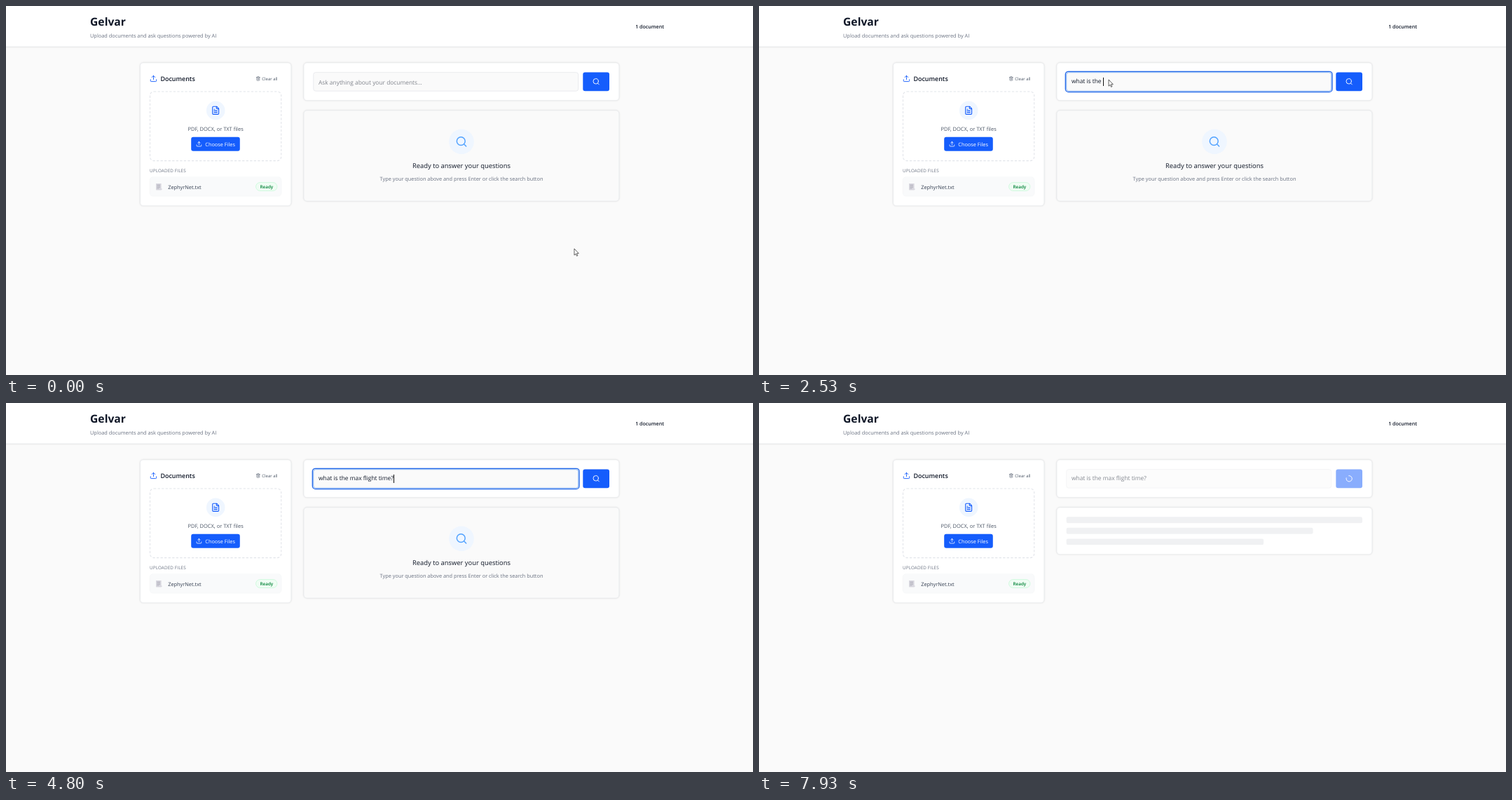
An HTML page for the animation above (8 s loop, 1066 px wide and 526 px high).

```html
<!DOCTYPE html>
<html lang="en">
<head>
<meta charset="utf-8">
<title>Document search</title>
<style>
  html, body { margin: 0; width: 100%; height: 100%; overflow: hidden; background: #fafafa; }
  body { position: relative; font-family: "Open Sans", "Noto Sans", sans-serif; text-rendering: geometricPrecision; }
  svg.stage { position: absolute; left: 0; top: 0; display: block; }
  .card { fill: #fff; stroke: #e5e7eb; stroke-width: .6; filter: drop-shadow(0 .6px .8px rgba(0, 0, 0, .13)); }
  .flat { fill: #fafafa; }
  .icon { fill: none; stroke-width: 2; stroke-linecap: round; stroke-linejoin: round; }
  .sm { font-size: 7.38px; }
  .mid { text-anchor: middle; }
  .semi { font-weight: 600; }
  .blue { fill: #155dfc; }
  .pale { fill: #eff6ff; }
  .muted { fill: #6a7282; }
  .dark { fill: #101828; }
  .typed { position: absolute; left: 446px; top: 102px; height: 12px; font-size: 8.39px;
    line-height: 12.2px; white-space: pre; color: #101828; }
  .caret { position: absolute; left: 100%; top: 0; width: .8px; height: 12px; background: #111; }
  .popup { position: absolute; top: 81.5px; height: 19.5px; box-sizing: border-box; display: flex; gap: 15.3px;
    padding: 0 6.5px 0 10.5px; border-radius: 4px; background: #2b2b2b; color: #fff;
    font-size: 7.3px; line-height: 19.6px; white-space: nowrap; box-shadow: 0 1px 2.5px rgba(0, 0, 0, .35); }
</style>
</head>
<body>
<svg class="stage" width="1066" height="526" viewBox="0 0 1066 526">
  <defs>
    <path id="upload" d="M21 15v4a2 2 0 0 1-2 2H5a2 2 0 0 1-2-2v-4M17 8l-5-5-5 5M12 3v12"/>
    <path id="search" d="M19 11a8 8 0 1 1-16 0a8 8 0 1 1 16 0M21 21l-4.34-4.34"/>
    <path id="trash" d="M3 6h18M19 6v14a2 2 0 0 1-2 2H7a2 2 0 0 1-2-2V6M8 6V4a2 2 0 0 1 2-2h4a2 2 0 0 1 2 2v2M10 11v6M14 11v6"/>
    <path id="file" d="M15 2H6a2 2 0 0 0-2 2v16a2 2 0 0 0 2 2h12a2 2 0 0 0 2-2V7ZM14 2v4a2 2 0 0 0 2 2h4M10 9H8M16 13H8M16 17H8"/>
  </defs>

  <!-- header -->
  <rect class="card" x="-5" y="-5" width="1076" height="63"/>
  <text class="dark" x="120" y="27.9" font-size="15.7" font-weight="700">Gelvar</text>
  <text class="muted sm" x="120" y="44.6">Upload documents and ask questions powered by AI</text>
  <text class="dark semi" x="939" y="32.2" font-size="7.1" text-anchor="end">1 document</text>

  <!-- documents -->
  <rect class="card" x="191.5" y="81" width="215.3" height="203.7" rx="4.4"/>
  <use class="icon" href="#upload" stroke="#155dfc" transform="translate(204.9 97.9) scale(.4625)"/>
  <text class="dark semi" x="220.4" y="107.2" font-size="8.95">Documents</text>
  <use class="icon" href="#trash" stroke="#4a5565" transform="translate(356.5 100.1) scale(.2775)"/>
  <text x="365.3" y="105.9" font-size="5.95" fill="#4a5565">Clear all</text>
  <rect x="205.5" y="122" width="187.2" height="98.6" rx="5.5" fill="none" stroke="#e2e5ea" stroke-width="1.1" stroke-dasharray="3.33 2.22"/>
  <circle class="pale" cx="299.2" cy="148.9" r="13.3"/>
  <use class="icon" href="#file" stroke="#155dfc" transform="translate(292.5 142.2) scale(.555)"/>
  <text class="mid" x="299.1" y="177.7" font-size="7.48" fill="#4a5565">PDF, DOCX, or TXT files</text>
  <rect class="blue" x="264.2" y="186.8" width="69.6" height="20" rx="3"/>
  <use class="icon" href="#upload" stroke="#fff" transform="translate(271 192.3) scale(.37)"/>
  <text x="284.3" y="199.9" font-size="7.35" fill="#fff">Choose Files</text>
  <text class="muted" x="205" y="237.1" font-size="6.3" letter-spacing=".14">UPLOADED FILES</text>
  <rect x="205.2" y="243.7" width="187.8" height="27.3" rx="4.4" fill="#f9fafb" stroke="#f3f4f6" stroke-width=".55"/>
  <path d="M214 253h7.6v7.6h1.2q0 2-1.6 2h-6.4q-.8 0-.8-1z" fill="#d9d8e0"/>
  <path d="M215.4 255h4.6M215.4 256.7h4.6M215.4 258.4h4.6M215.4 260.1h3" stroke="#9d9ba8" stroke-width=".6"/>
  <text x="231.2" y="260.5" class="sm" fill="#364153">ZephyrNet.txt</text>
  <rect x="356.6" y="251.6" width="30.3" height="11.8" rx="5.9" fill="#f0fdf4" stroke="#b9f8cf" stroke-width=".6"/>
  <text class="mid semi" x="371.9" y="259.9" font-size="6.3" fill="#008236">Ready</text>

  <!-- question -->
  <rect class="card" x="425" y="81" width="449.8" height="53.6" rx="4.4"/>
  <g id="field">
    <rect x="438.7" y="94.7" width="378" height="26.5" rx="3.2" fill="#fafafa" stroke="#e2e4e8" stroke-width=".7"/>
    <g id="ring" fill="none">
      <rect x="438.7" y="94.7" width="378" height="26.5" rx="3.2" stroke="#60a0fa" stroke-width=".7"/>
      <rect x="437.3" y="93.3" width="380.8" height="29.3" rx="4.3" stroke="#2468e8" stroke-width="1.3"/>
    </g>
    <text id="hint" x="446" y="111.5" font-size="8.39" fill="#81858d">Ask anything about your documents...</text>
  </g>
  <g id="button">
    <rect class="blue" x="823.3" y="94.4" width="37.7" height="26.8" rx="3"/>
    <use id="glass" class="icon" href="#search" stroke="#fff" transform="translate(836.6 102.2) scale(.4625)"/>
    <path id="spinner" class="icon" stroke="#fff" d="M21 12a9 9 0 1 1-6.219-8.56"/>
  </g>

  <!-- answer -->
  <g id="empty">
    <rect class="card flat" x="425" y="149" width="449.8" height="129" rx="4.4"/>
    <circle class="pale" cx="650" cy="193.4" r="17.8"/>
    <use class="icon" href="#search" stroke="#51a2ff" transform="translate(641.1 184.5) scale(.74)"/>
    <text class="mid dark" x="650" y="231.4" font-size="9.38">Ready to answer your questions</text>
    <text class="mid muted" x="650" y="248.7" font-size="7.36">Type your question above and press Enter or click the search button</text>
  </g>
  <g id="loading">
    <rect class="card" x="425" y="149" width="449.8" height="66.7" rx="4.4"/>
    <g id="bars" fill="#e5e7eb">
      <rect x="438.6" y="162.3" width="422.4" height="8.9" rx="2.2"/>
      <rect x="438.6" y="177.8" width="352" height="8.9" rx="2.2"/>
      <rect x="438.6" y="193.4" width="281.5" height="8.9" rx="2.2"/>
    </g>
  </g>
</svg>

<div class="typed" id="typed"><span id="words"></span><i class="caret" id="caret"></i></div>
<div class="popup" id="popup"></div>

<svg class="stage" width="1066" height="526" viewBox="0 0 1066 526">
  <path id="arrow" d="M0 0V9.2L2.1 7.3L3.5 10.4L4.9 9.8L3.5 6.7H6.3Z" fill="#fff" stroke="#111" stroke-width=".65" stroke-linejoin="round"/>
  <path id="beam" d="M-1.7 -4.5H-.4L0 -4.1L.4 -4.5H1.7M-1.7 4.5H-.4L0 4.1L.4 4.5H1.7M0 -4.1V4.1" fill="none" stroke="#222" stroke-width=".6"/>
</svg>

<script>
const LOOP = 8000, TICK = 1000 / 15;
const FOCUS = 930, SEND = 5200;
const QUESTION = "what is the max flight time?";

// [time, characters typed]
const KEYS = [
  [0, 0], [1330, 1], [1470, 2], [1670, 3], [1800, 5], [2000, 6], [2070, 7], [2130, 8],
  [2270, 9], [2330, 10], [2470, 11], [2530, 12], [2670, 13], [2870, 14], [3070, 15],
  [3270, 16], [3600, 17], [3870, 18], [3930, 19], [4000, 20], [4070, 21], [4130, 23],
  [4270, 24], [4330, 25], [4470, 26], [4530, 27], [4730, 28]
];

// [from, to, left, suggestions]
const POPUPS = [
  [1530, 1800, 453.5, "we|we are|what"],
  [2730, 3070, 499.5, "may|more|might"],
  [3270, 3600, 510.5, "is|and|of"],
  [3730, 3870, 513.5, "for|from|found"],
  [3870, 4130, 513.5, "flexible|flowering|flexibility"],
  [4730, 4800, 550.5, "time|times|that"]
];

// [time, x, y]
const PATH = [[0, 811, 346], [600, 490, 104.5], [730, 499, 105]];

const el = {};
for (const node of document.querySelectorAll("[id]")) el[node.id] = node;

const clamp = v => Math.max(0, Math.min(1, v));
const smooth = v => v * v * (3 - 2 * v);
const show = (node, on) => { node.style.display = on ? "" : "none"; };
const place = (node, x, y) => node.setAttribute("transform", `translate(${x} ${y})`);

function pointer(t) {
  let i = 0;
  while (i < PATH.length - 2 && t >= PATH[i + 1][0]) i++;
  const [t0, x0, y0] = PATH[i], [t1, x1, y1] = PATH[i + 1];
  const p = smooth(clamp((t - t0) / (t1 - t0)));
  return [x0 + (x1 - x0) * p, y0 + (y1 - y0) * p];
}

function drawPointer(t) {
  const [x, y] = pointer(t);
  const overField = x > 438 && x < 817 && y > 94 && y < 121;
  show(el.beam, overField && t < 1330);
  show(el.arrow, !overField || (t >= 1470 && t < 2670));
  place(el.beam, x, y);
  place(el.arrow, x, y);
}

function drawPopup(t) {
  const hit = POPUPS.find(([from, to]) => t >= from && t < to);
  show(el.popup, hit);
  if (!hit) return;
  el.popup.style.left = hit[2] + "px";
  el.popup.replaceChildren(...hit[3].split("|").map(word => {
    const span = document.createElement("span");
    span.textContent = word;
    return span;
  }));
}

function draw(time) {
  // screen refreshes fifteen times a second
  const t = Math.floor((time % LOOP + 4) / TICK) * TICK + 4;
  const sent = t >= SEND;
  const fade = clamp((t - SEND + 60) / 150);

  const count = KEYS.filter(([at]) => t >= at).pop()[1];
  el.words.textContent = QUESTION.slice(0, count);
  show(el.hint, count === 0);
  show(el.caret, t >= FOCUS && !sent);
  el.ring.style.opacity = sent ? 1 - fade : clamp((t - FOCUS + 60) / 200);

  const dim = sent ? 1 - .5 * fade : 1;
  el.field.style.opacity = el.typed.style.opacity = el.button.style.opacity = dim;

  show(el.empty, !sent);
  show(el.loading, sent);
  show(el.glass, !sent);
  show(el.spinner, sent);
  el.bars.style.opacity = 1 - .45 * smooth(clamp((t - SEND) / 800));
  const turn = (t - SEND) * .36;
  el.spinner.setAttribute("transform", `translate(842.1 107.8) rotate(${turn}) scale(.4625) translate(-12 -12)`);

  drawPopup(t);
  drawPointer(t);
}

const start = performance.now();
function frame() {
  draw(performance.now() - start);
  requestAnimationFrame(frame);
}
frame();
</script>
</body>
</html>
```
